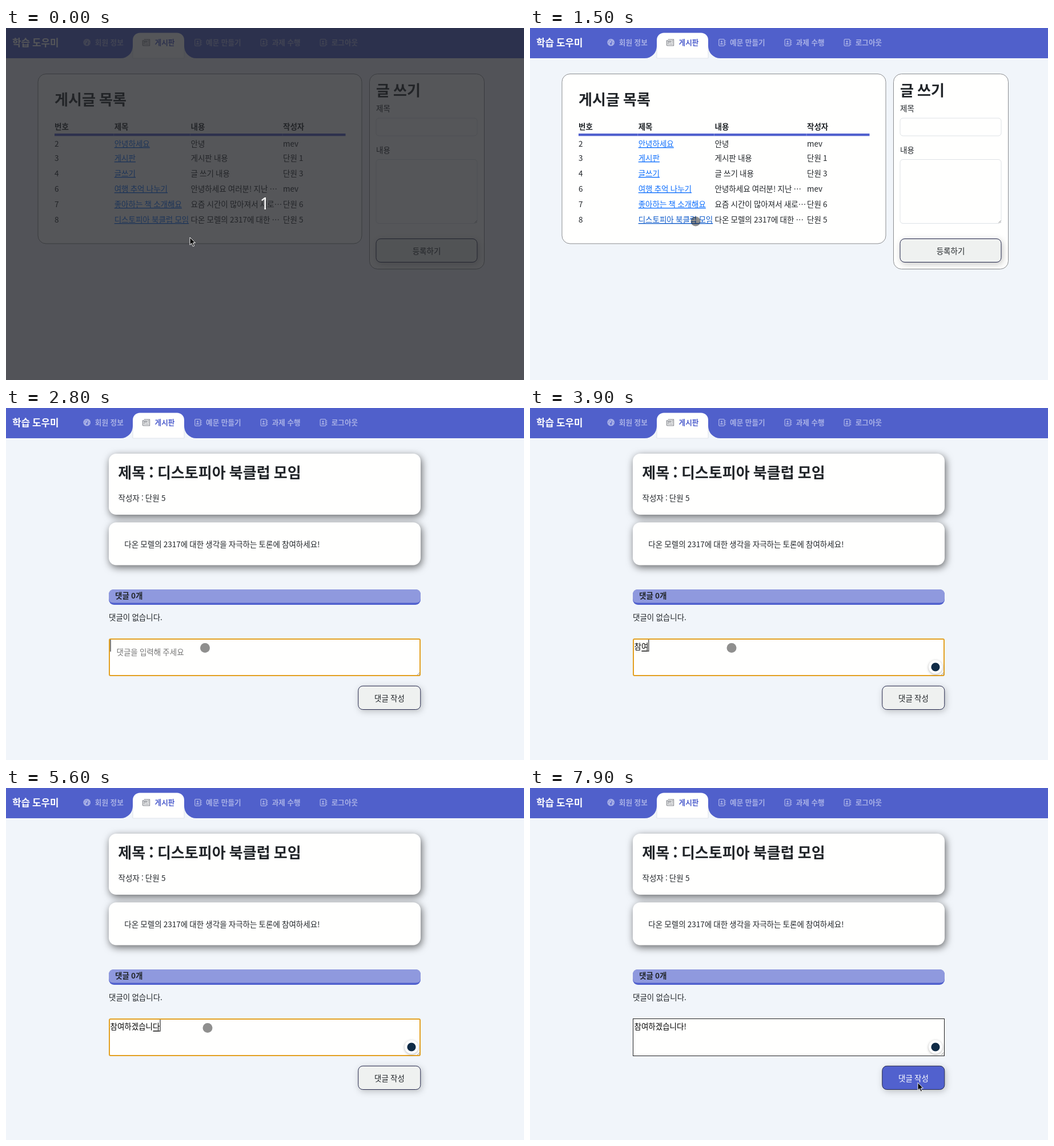
An HTML page for the animation above (8 s loop, 907 px wide and 617 px high).

```html
<!DOCTYPE html>
<html lang="ko">
<head>
<meta charset="utf-8">
<title>학습 도우미</title>
<style>
  html, body { margin: 0; width: 100%; height: 100%; overflow: hidden; background: #f1f5fa; }
  svg { display: block; width: 100vw; height: 100vh; }
  text { font: 13.5px "Noto Sans CJK KR", "Noto Sans CJK", sans-serif; word-spacing: -.045em; fill: #212529; }
  .bold { font-weight: 700; }
  .head { font-size: 26.04px; font-weight: 700; }
  .nav text { font-size: 12.65px; font-weight: 700; word-spacing: 0; fill: #a8b0e6; }
  .nav .active { fill: #5161ce; }
  .nav .brand { font-size: 16.87px; word-spacing: -.045em; fill: #fff; }
  .link { fill: #0d6efd; text-decoration: underline; }
  .link.hover { fill: #0a58ca; }
  .mid { text-anchor: middle; }
  .card { fill: #fffffe; stroke: #8b8d90; }
  .raised { fill: #fffffe; filter: drop-shadow(2.5px 4px 7px rgba(0, 0, 0, .58)); }
  .field { fill: #fffffe; stroke: #dee2e6; }
  .button { fill: #eff1f0; stroke: #23264a; filter: drop-shadow(2px 3px 6px rgba(0, 0, 0, .22)); }
  .hot .button { fill: #5161ce; }
  .hot text { fill: #fff; }
  .grip { fill: none; stroke: #777; stroke-width: .8; }
  .count { font: 29.5px "Noto Sans", sans-serif; fill: #fff; }
</style>
</head>
<body>
<svg viewBox="0 0 907 617">
  <defs>
    <g id="book" fill="none" stroke="#a8b0e6" stroke-width="1.3">
      <rect x=".7" y=".7" width="9.6" height="11.6" rx="1.6"/>
      <path d="M12 2.5v2M12 5.7v2M12 8.9v2"/>
      <circle cx="5.5" cy="4.8" r="1.6" fill="#a8b0e6" stroke="none"/>
      <path d="M2.9 9.8q0-2.5 2.6-2.5t2.6 2.5z" fill="#a8b0e6" stroke="none"/>
    </g>
  </defs>
  <rect width="907" height="617" fill="#f1f5fa"/>

  <g class="nav">
    <rect width="907" height="53" fill="#5060cb"/>
    <path d="M201 53a21 21 0 0 0 21-21h90a21 21 0 0 0 21 21z" fill="#f1f5fa"/>
    <path d="M222 53V21a12.600 12.600 0 0 1 12.600-12.600h64.800a12.600 12.600 0 0 1 12.600 12.600V53z" fill="#fffffe"/>
    <path d="M222 36V53H312V36" fill="none" stroke="#dfe3ea"/>
    <text class="brand" x="11" y="32">학습 도우미</text>
    <circle cx="141.700" cy="25.300" r="6.300" fill="#a8b0e6"/>
    <path d="M141.700 27.500L143.600 22.800M137.300 25.800h1.200M145 25.800h1.200M138.500 22.300l.8.8M141 20.800v1.200" stroke="#5060cb" stroke-width="1.100"/>
    <circle cx="141.700" cy="27.800" r="1.500" fill="#5060cb"/>
    <g fill="none" stroke="#8d9096" stroke-width="1.300">
      <path d="M241.700 20.200h9.800v10.600h-11q-1.200 0-1.200-1.400v-7.200h2.400v7"/>
      <path d="M243.500 22.600h3v2.600h-3zM248 22.500h2.200M248 25.200h2.200M243.300 28.200h6.900"/>
    </g>
    <use href="#book" x="330" y="19"/>
    <use href="#book" x="445.500" y="19"/>
    <use href="#book" x="549.500" y="19"/>
    <text x="155.800" y="30">회원 정보</text>
    <text class="active" x="260.500" y="30">게시판</text>
    <text x="350" y="30">예문 만들기</text>
    <text x="465.700" y="30">과제 수행</text>
    <text x="569.700" y="30">로그아웃</text>
  </g>

  <g id="listPage">
    <rect class="card" x="56" y="80.500" width="567" height="297.500" rx="14"/>
    <text class="head" x="85" y="135">게시글 목록</text>
    <g id="table"></g>

    <rect class="card" x="636.500" y="80.500" width="201" height="342" rx="14"/>
    <text class="head" x="648" y="118.500">글 쓰기</text>
    <text x="648" y="146">제목</text>
    <rect class="field" x="648" y="158" width="177" height="31" rx="5"/>
    <text x="648" y="218.500">내용</text>
    <rect class="field" x="648" y="230.500" width="177" height="112" rx="5"/>
    <path class="grip" d="M820.500 341.500l4-4M823 341.500l1.500-1.500"/>
    <rect class="button" x="648" y="369.500" width="177" height="41" rx="8"/>
    <text class="mid" x="736.500" y="396">등록하기</text>
  </g>

  <g id="postPage">
    <rect class="raised" x="180" y="80" width="546" height="107" rx="13"/>
    <text class="head" x="196.300" y="123">제목 : 디스토피아 북클럽 모임</text>
    <text x="196.500" y="163">작성자 : 단원 5</text>
    <rect class="raised" x="180" y="200.500" width="546" height="75" rx="13"/>
    <text x="207.300" y="244">다온 모렐의 2317에 대한 생각을 자극하는 토론에 참여하세요!</text>

    <rect x="180" y="318" width="546" height="27" rx="9" fill="#5161ce"/>
    <path d="M180 327q0-9 9-9h528q9 0 9 9v7q0 7.500-9 7.500H189q-9 0-9-7.500z" fill="#8f99de"/>
    <text class="bold" x="191" y="334">댓글 0개</text>
    <text x="180" y="372">댓글이 없습니다.</text>

    <rect id="area" fill="#fffffe"/>
    <path class="grip" d="M720 468l4.500-4.500M722.800 468l1.700-1.700"/>
    <text id="hint" x="193.500" y="433" style="fill:#757575">댓글을 입력해 주세요</text>
    <text id="typed" x="182.500" y="423" style="fill:#000"></text>
    <rect id="composing" y="425.300" width="11.400" height="1.500" fill="#111"/>
    <rect id="caret" y="406" width="1" height="21" fill="#000"/>
    <g id="badge">
      <circle cx="710" cy="454" r="12" fill="#fff" style="filter:drop-shadow(0 1px 2px rgba(0,0,0,.3))"/>
      <circle cx="710" cy="454" r="7.600" fill="#0f2b46"/>
    </g>
    <g id="send">
      <rect class="button" x="616.800" y="487.300" width="109" height="41.200" rx="8"/>
      <text class="mid" x="671.500" y="514">댓글 작성</text>
    </g>
  </g>

  <g id="countdown">
    <rect width="907" height="617" fill="rgb(34,36,40)" opacity=".77"/>
    <text class="count mid" x="453" y="318">1</text>
  </g>
  <circle id="dot" r="8.500" opacity=".44"/>
  <path id="arrow" d="M0 0V13.200L3 10.400L5.300 15.800L7.600 14.800L5.300 9.600H9.400Z" stroke="#fff"/>
</svg>
<script>
const LOOP = 8000, STEP = 100;
const $ = id => document.getElementById(id);

const columns = [85, 189.7, 323.5, 485];
const posts = [
  [2, '안녕하세요', '안녕', 'mev'],
  [3, '게시판', '게시판 내용', '단원 1'],
  [4, '글쓰기', '글 쓰기 내용', '단원 3'],
  [6, '여행 추억 나누기', '안녕하세요 여러분! 지난 …', 'mev'],
  [7, '좋아하는 책 소개해요', '요즘 시간이 많아져서 새로…', '단원 6'],
  [8, '디스토피아 북클럽 모임', '다온 모렐의 2317에 대한 …', '단원 5'],
];
const row = (cells, y, classes) => cells.map((cell, i) =>
  `<text x="${columns[i]}" y="${y}" class="${classes[i] || ''}">${cell}</text>`).join('');

$('table').innerHTML =
  row(['번호', '제목', '내용', '작성자'], 178, Array(4).fill('bold')) +
  '<rect x="85" y="185" width="509.500" height="4.300" fill="#5161ce"/>' +
  columns.slice(1).map(x => `<rect x="${x - 1.2}" y="185" width=".6" height="4.300" fill="#fff" opacity=".5"/>`).join('') +
  posts.map((post, i) => row(post, i ? 206 + 27 * i : 208, ['', 'link'])).join('');
const links = document.querySelectorAll('.link');
const hoveredLink = links[links.length - 1];

// Pointer stops: time, x, y
const pointer = [
  [200, 322, 368.5], [1100, 288.5, 338.5], [1300, 288.5, 338.5], [1500, 290, 339],
  [1600, 290, 339], [2000, 306.5, 349.5], [2100, 306.5, 349.5], [2500, 348.5, 420.5],
  [2800, 348.5, 420.5], [3000, 353, 420.5], [6500, 353, 420.5], [7200, 699.5, 531.5],
  [7400, 683.5, 522.5], [7500, 679, 518],
];
const typing = [
  [0, ''], [3600, '차'], [3800, '참'], [3900, '참여'],
  [4400, '참여ㅎ'], [4500, '참여하'], [4600, '참여하게'], [4700, '참여하겠'],
  [4900, '참여하겠ㅅ'], [5000, '참여하겠스'], [5100, '참여하겠습'],
  [5300, '참여하겠습ㄴ'], [5400, '참여하겠습니'], [5500, '참여하겠습닏'],
  [5600, '참여하겠습니다'], [5800, '참여하겠습니다!'],
];

function pointerAt(t) {
  const next = pointer.findIndex(stop => stop[0] > t);
  if (next === 0) return pointer[0].slice(1);
  if (next < 0) return pointer[pointer.length - 1].slice(1);
  const [t0, x0, y0] = pointer[next - 1], [t1, x1, y1] = pointer[next];
  const u = (t - t0) / (t1 - t0), k = u * u * (3 - 2 * u);
  return [x0 + (x1 - x0) * k, y0 + (y1 - y0) * k];
}

const show = (id, visible) => $(id).style.display = visible ? '' : 'none';
const within = (t, from, to) => t >= from && t < to;
function set(id, attributes) {
  for (const name in attributes) $(id).setAttribute(name, attributes[name]);
}

function drawComment(t) {
  const focused = within(t, 2800, 7800);
  set('area', focused
    ? { x: 181, y: 405, width: 544, height: 64, rx: 2, stroke: '#e3a021', 'stroke-width': 2 }
    : { x: 180.5, y: 404.5, width: 545, height: 65, rx: 0, stroke: '#222', 'stroke-width': 1 });

  const text = typing.filter(entry => entry[0] <= t).pop()[1];
  const done = text.endsWith('!');
  const end = 182.5 + 12.42 * (text.length - done) + (done ? 4.4 : 0);
  $('typed').textContent = text;
  set('composing', { x: end - 12 });
  set('caret', { x: end });
  show('hint', !text);
  show('composing', text && !done);
  show('caret', focused && !within(t, 3200, 3600) && !within(t, 6300, 6800) && t < 7300);
  show('badge', t >= 2900);
  $('send').classList.toggle('hot', t >= 7700);
}

function draw(now) {
  const t = Math.floor(now % LOOP / STEP) * STEP;
  const [x, y] = pointerAt(t);
  const arrow = t < 100 || t >= 7900;
  show('listPage', t < 1700);
  show('postPage', t >= 1700);
  show('countdown', t < 100);
  hoveredLink.classList.toggle('hover', t >= 1400);
  drawComment(t);
  show('dot', !arrow);
  show('arrow', arrow);
  set('dot', { cx: x, cy: y });
  set('arrow', { transform: `translate(${x} ${y - 1.5})` });
}

let start;
function tick(now) {
  start ??= now;
  draw(now - start);
  requestAnimationFrame(tick);
}
draw(0);
requestAnimationFrame(tick);
</script>
</body>
</html>
```
